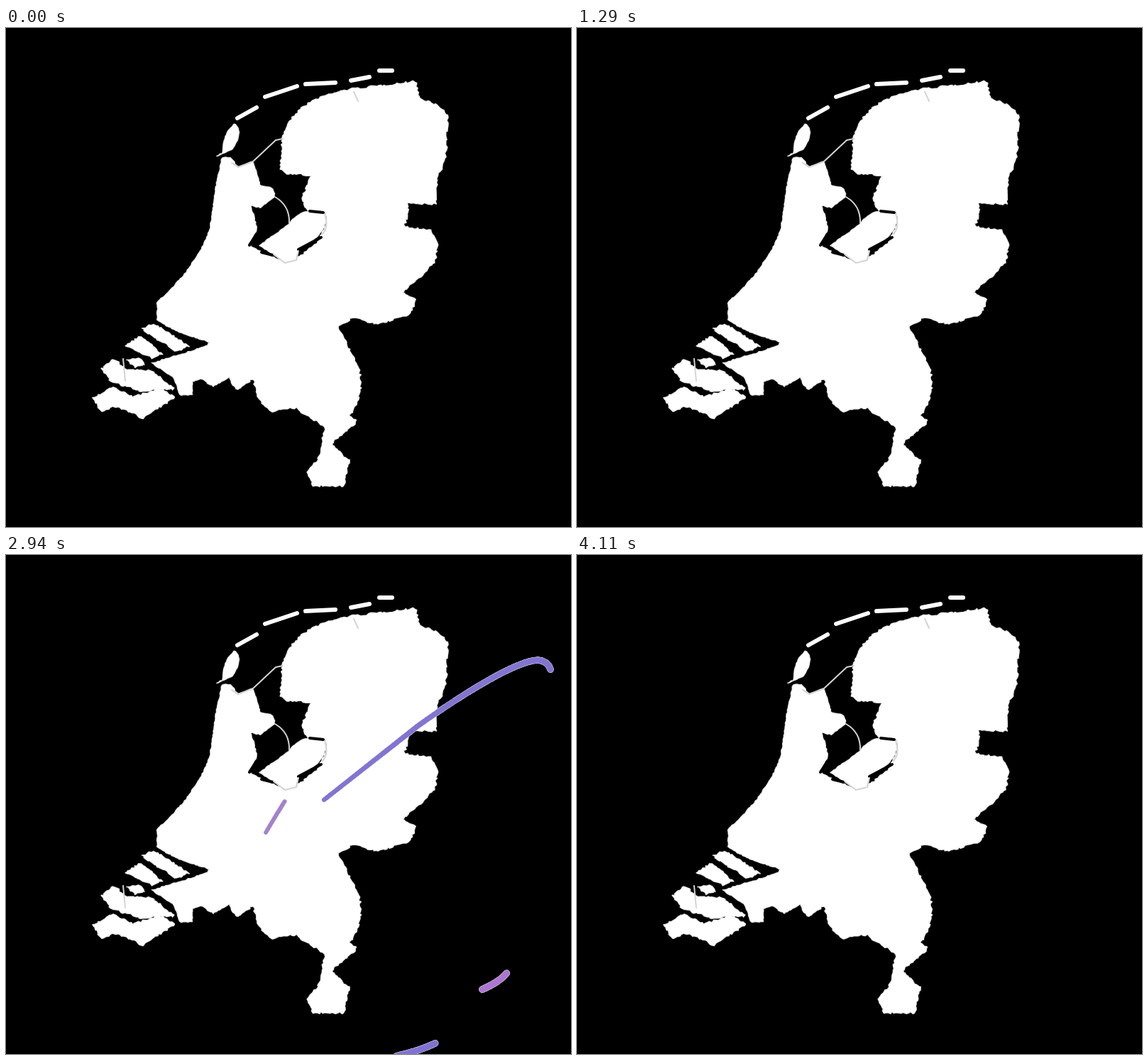
An HTML page with a canvas for the animation above (4.41 s loop, 796 by 703 pixels).

```html
<!DOCTYPE html>
<html>
<head>
<meta charset="utf-8">
<style>
html, body { margin: 0; width: 100%; height: 100%; overflow: hidden; background: #000; }
canvas { display: block; }
</style>
</head>
<body>
<canvas id="stage" width="796" height="703"></canvas>
<script>
const LOOP = 4410, STEP = 30, TRAILS_END = 4110;
const ctx = document.getElementById('stage').getContext('2d');
ctx.lineCap = ctx.lineJoin = 'round';

let seed = 7;
const random = () => (seed = seed * 16807 % 2147483647) / 2147483647;
const clamp = x => Math.max(0, Math.min(1, x));

function svgPath(d) {
  const path = document.createElementNS('http://www.w3.org/2000/svg', 'path');
  path.setAttribute('d', d);
  return path;
}

// Follows a simple outline and frays it into a ragged shore
function coast(d, roughness = 1.5) {
  const outline = svgPath(d), length = outline.getTotalLength(), shore = new Path2D();
  for (let s = 0; s < length; s += 3) {
    const p = outline.getPointAtLength(s);
    const jitter = () => (random() * 2 - 1) * roughness;
    shore.lineTo(p.x + jitter(), p.y + jitter());
  }
  shore.closePath();
  return shore;
}

const land = [
  // north and east
  coast(`M390 155C396 120 430 95 487 86Q540 80 577 75L582 99 606 108 623 123C618 165 626 180 607 212L605 248
    565 247 567 263 560 280 597 285 608 304 604 331 572 361 560 373 430 420 405 328C430 310 455 295 450 260
    L424 256 417 240 430 208 395 205 386 198Z`),
  // south
  coast(`M560 373L578 382 570 403 523 418 490 407 468 421 488 461Q514 505 483 547L495 554 458 586 484 610 476 645
    432 645 425 625 440 608 449 562 408 535 372 540 353 518 349 494 326 510 313 491 292 505 276 494 290 420 420 340Z`),
  // west
  coast(`M300 500L276 494 263 498 262 517 245 517 236 492 205 472 258 456 292 444Q240 430 213 411L213 386
    C260 345 287 300 290 265Q294 225 305 182L316 182 327 196 348 188 358 222 376 226 379 238 358 253 345 250
    354 284 341 306 394 331 430 320 470 400Z`, 0.8),
  // polder
  coast('M357 306L398 277Q415 250 450 262Q455 290 413 310L408 327 394 331Z', 0.6),
  // islands
  coast('M297 181L305 176Q305 150 322 135Q336 145 320 170Z', 0.6),
  coast('M191 424L208 417 258 448 240 456Z'),
  coast('M167 448L190 435 220 460 205 465Z'),
  coast('M170 467L190 465 196 474 180 478Z'),
  coast('M134 480L152 467 173 482 205 482 237 509 190 511 150 499Z'),
  coast('M123 522L150 506 180 520 215 508 239 519 194 550 152 532 134 541Z')
];
const sandbars = new Path2D('M326 127L353 112M365 97L410 82M422 79L464 77M486 74L512 69M526 60L544 60');
const creeks = new Path2D('M412 312L444 295M360 316L376 320M343 306L353 290M222 488L232 497M428 258L447 260');
const dikes = new Path2D(`M318 190L327 196 348 188 380 158 390 156M379 238Q400 250 399 275
  M449 262Q455 280 446 290M412 314L409 327 393 331 377 319M165 466L168 497M490 90L496 103`);

// Path, head travel time, tail delay and tail travel time in ms
const route = (d, head, lag, tail) => {
  const path = svgPath(d);
  return { path, length: path.getTotalLength(), head, lag, tail };
};
const northeast = route('M368 408L580 241C650 191 722 148 750 148C782 152 764 194 753 215', 510, 393, 342);
const east = route('M384 400C530 440 660 495 700 542C725 572 712 594 671 612', 470, 347, 320);
const southeast = route('M366 404C470 480 620 580 640 630C655 668 610 692 550 706', 500, 340, 340);
const north = route('M360 375L387 224 401 137', 160, 100, 150);
const top_ = route('M366 391C440 265 540 130 662 -12', 450, 200, 400);
const northwest = route('M369 388C345 335 290 255 231 229C190 208 150 196 115 196C85 196 55 201 29 212', 446, 197, 543);
const west = route('M366 385C330 325 270 299 206 278C135 255 65 257 -12 306', 410, 205, 505);
const southwest = route('M374 362C235 418 160 510 151 625L150 712', 446, 288, 426);
const south = route('M377 408C318 468 285 540 268 605L250 712', 325, 335, 255);

const trails = [
  [east, 25, '#9669c8'], [northeast, 203, '#9c70cf'], [north, 380, '#8f6bbd'],
  [northwest, 460, '#8348c9'], [top_, 485, '#a283cc'], [southwest, 576, '#8470d0'],
  [southeast, 2300, '#8072d3'], [east, 2303, '#ac76d1'], [northeast, 2483, '#8275d2'],
  [north, 2640, '#9669c8'], [top_, 2894, '#a283cc'], [northwest, 3200, '#8573d6'],
  [west, 3270, '#bd74d4'], [southwest, 3392, '#bd74d4'], [south, 3520, '#9059ec']
];

function drawTrail([{ path, length, head, lag, tail }, start, colour], time) {
  const age = time - start;
  const to = clamp(age / head), from = clamp((age - lag) / tail);
  if (to <= from) return;
  const count = Math.ceil((to - from) * length / 6);
  const points = Array.from({ length: count + 1 }, (_, i) => {
    const u = from + (to - from) * i / count;
    const { x, y } = path.getPointAtLength(u * length);
    return { x, y, width: 5.5 + 3.5 * u };
  });
  for (const [style, rim] of [['#eee', 1], [colour, 0]]) {
    ctx.strokeStyle = style;
    for (let i = 0; i < count; i++) {
      ctx.lineWidth = points[i].width + rim;
      ctx.beginPath();
      ctx.moveTo(points[i].x, points[i].y);
      ctx.lineTo(points[i + 1].x, points[i + 1].y);
      ctx.stroke();
    }
  }
}

function strokePath(path, colour, width) {
  ctx.strokeStyle = colour;
  ctx.lineWidth = width;
  ctx.stroke(path);
}

function drawMap() {
  ctx.fillStyle = '#000';
  ctx.fillRect(0, 0, 796, 703);
  land.forEach(shore => strokePath(shore, '#ccc', 1.5));
  ctx.fillStyle = '#fff';
  land.forEach(shore => ctx.fill(shore));
  strokePath(sandbars, '#fff', 6);
  strokePath(creeks, '#000', 4);
  strokePath(dikes, '#d4d4d4', 2);
}

function frame() {
  const time = Math.floor(performance.now() % LOOP / STEP) * STEP;
  drawMap();
  if (time < TRAILS_END) trails.forEach(trail => drawTrail(trail, time));
  requestAnimationFrame(frame);
}
frame();
</script>
</body>
</html>
```
